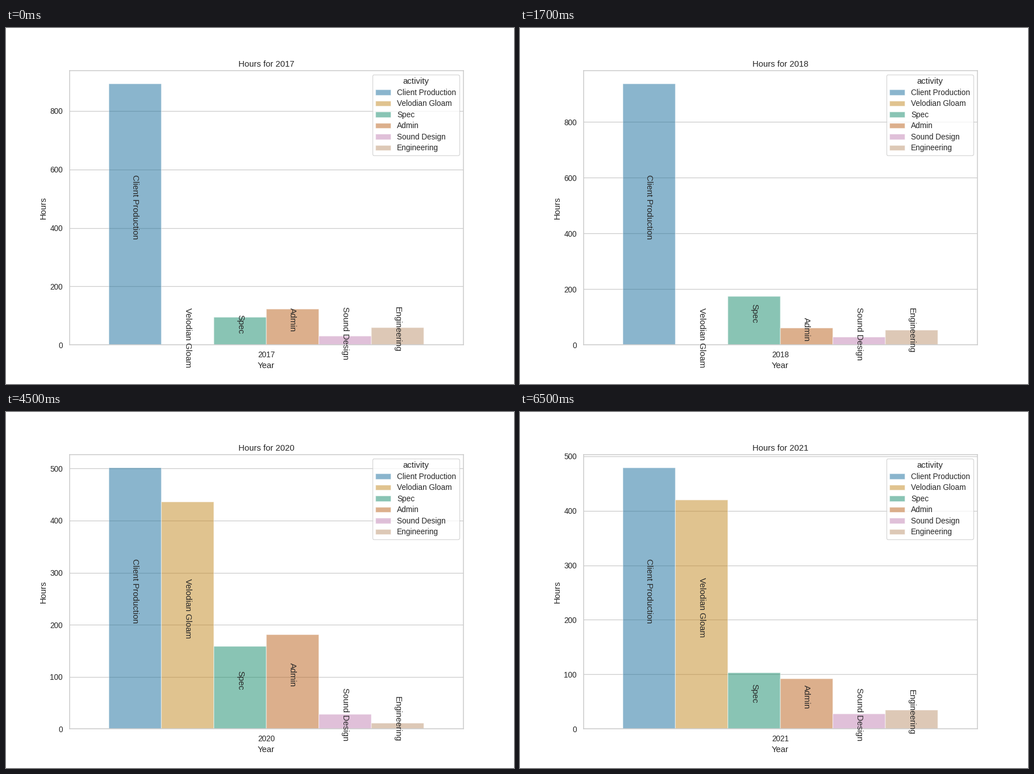
A matplotlib script that plays this animation: 894 by 626 pixels, repeating every 8000 ms.

```python
import colorsys

import matplotlib.pyplot as plt
from matplotlib.animation import FuncAnimation
from matplotlib.colors import to_rgb

DPI = 89.4
FRAME_MS = 500
FRAMES_PER_YEAR = 4
LEAD_IN = 3  # the first year shows for one frame only

ACTIVITIES = ["Client Production", "Velodian Gloam", "Spec",
              "Admin", "Sound Design", "Engineering"]
HOURS = {
    2017: [893, 0, 94.5, 122.5, 30, 59],
    2018: [937, 0, 174, 60.5, 28, 53],
    2019: [663, 259, 106, 65, 43.5, 27.5],
    2020: [501.5, 436, 158.5, 181, 28, 11],
    2021: [479, 420, 103, 92, 27.5, 34.5],
}
YEARS = list(HOURS)
BAR_WIDTH = 0.8 / len(ACTIVITIES)


def desaturate(color, amount=0.75):
    hue, light, sat = colorsys.rgb_to_hls(*to_rgb(color))
    return colorsys.hls_to_rgb(hue, light, sat * amount)


COLORS = [desaturate(c) for c in ("#0173B2", "#DE8F05", "#029E73",
                                  "#D55E00", "#CC78BC", "#CA9161")]

INK = "0.15"
plt.rcParams.update({
    "font.family": "Liberation Sans", "font.size": 12,
    "text.color": INK, "axes.labelcolor": INK,
    "xtick.color": INK, "ytick.color": INK,
    "axes.titlesize": 12, "axes.labelsize": 12,
    "xtick.labelsize": 11, "ytick.labelsize": 11,
    "legend.fontsize": 11, "legend.title_fontsize": 12,
    "legend.labelspacing": 0.4,
    "axes.edgecolor": "0.8", "axes.linewidth": 1.25, "axes.axisbelow": True,
    "axes.grid": True, "axes.grid.axis": "y",
    "grid.color": "0.8", "grid.linewidth": 1,
    "xtick.bottom": False, "ytick.left": False,
    "xtick.major.size": 6, "ytick.major.size": 6,
    "xtick.major.pad": 3,
})

# The small margin keeps the pixel size from rounding down.
fig, ax = plt.subplots(figsize=(894.01 / DPI, 626.01 / DPI), dpi=DPI)


def draw(frame):
    year = YEARS[(frame + LEAD_IN) // FRAMES_PER_YEAR]
    hours = HOURS[year]
    ax.clear()
    for i, (name, value, color) in enumerate(zip(ACTIVITIES, hours, COLORS)):
        x = -0.4 + (i + 0.5) * BAR_WIDTH
        ax.bar(x, value, BAR_WIDTH, color=color, edgecolor="white",
               linewidth=1, alpha=0.5, label=name, snap=False)
        ax.annotate(name, (x, value / 2), xytext=(0, 10),
                    textcoords="offset points", ha="center", va="center",
                    rotation=270)
    ax.set(xlim=(-0.5, 0.5), ylim=(0, max(hours) * 1.05),
           xlabel="Year", ylabel="Hours", title=f"Hours for {year}")
    ax.set_xticks([0], [str(year)])
    ax.legend(title="activity", loc="upper right")
    return []


animation = FuncAnimation(fig, draw, frames=16, init_func=lambda: [],
                          interval=FRAME_MS, repeat=True, repeat_delay=0)
plt.show()
```
